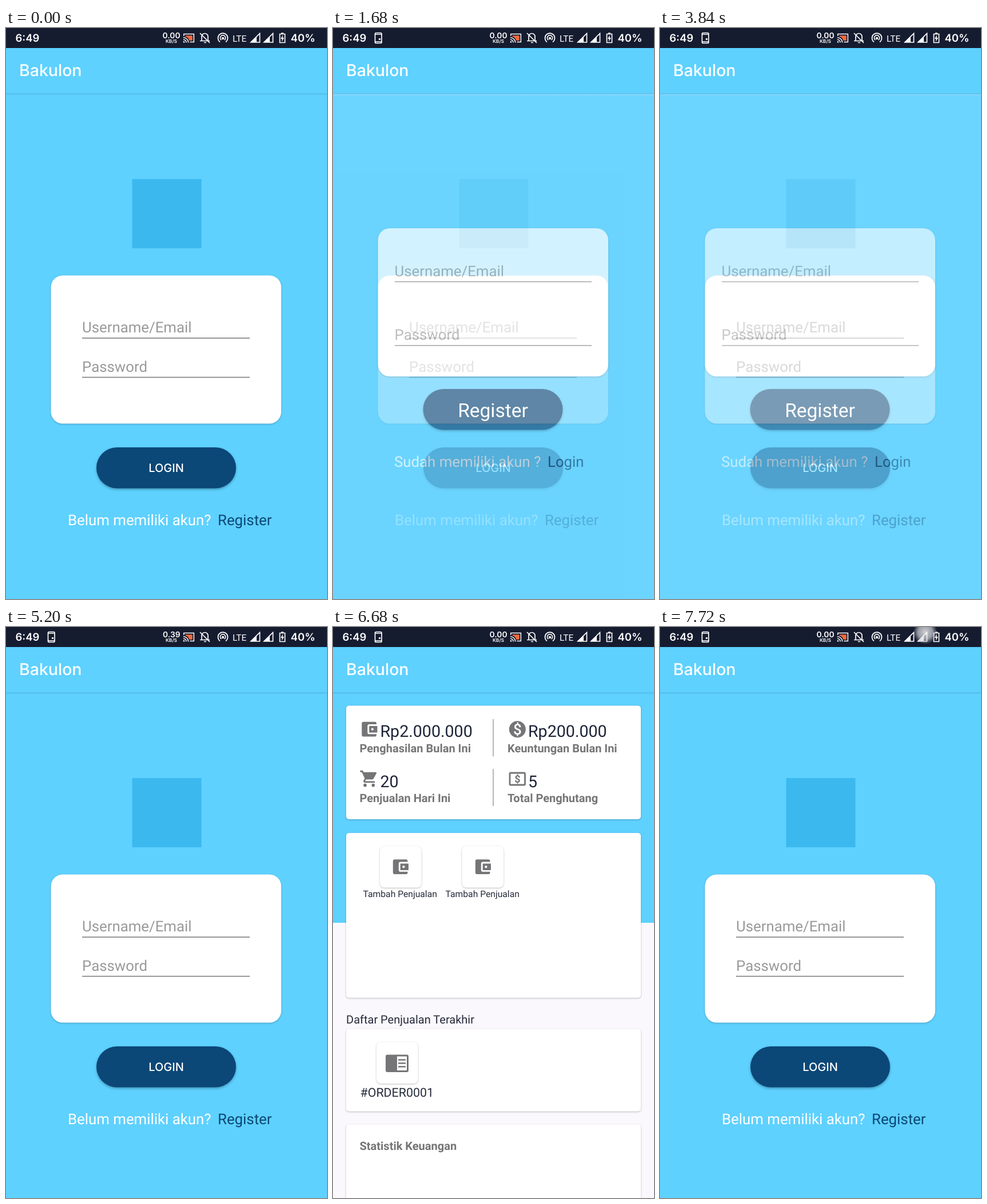
Recreate the animation shown at these times as an HTML page. Size 561 px wide and 998 px high, loop 7800 ms.

```html
<!DOCTYPE html>
<html lang="id">
<head>
<meta charset="utf-8">
<title>Login flow</title>
<style>
  html, body { margin: 0; width: 100%; height: 100%; overflow: hidden; background: #5ed1ff; }
  svg { display: block; width: 561px; height: 998px; font-family: Roboto, sans-serif; text-rendering: geometricPrecision; }
  .ui { font-family: Inter, sans-serif; font-weight: 500; fill: #fff; }
  .bold { font-weight: 600; }
  .form { font-size: 25.8px; }
  .hint { fill: #9a9a9a; }
  .light { fill: #fff; }
  .link { fill: #0b4777; }
  .line { stroke: #757575; stroke-width: 1.5; }
  .card { fill: #fff; filter: drop-shadow(0 1.5px 1.5px rgba(0, 0, 0, .25)); }
  .button { fill: #0b4777; filter: drop-shadow(0 2px 2px rgba(0, 0, 0, .3)); }
  .value { font-size: 28.6px; fill: #1d2538; }
  .label { font-size: 20px; font-weight: 700; fill: #757575; }
  .dark { fill: #252b3b; }
  .icon { fill: #757477; }
  .status { fill: #fff; }
  .stroke { fill: none; stroke: #fff; stroke-width: 1.7; }
</style>
</head>
<body>
<svg viewBox="0 0 561 998">
  <defs>
    <radialGradient id="touch">
      <stop offset="0" stop-color="#fff" stop-opacity=".8"/>
      <stop offset=".65" stop-color="#dadde0" stop-opacity=".65"/>
      <stop offset="1" stop-color="#8a9098" stop-opacity=".2"/>
    </radialGradient>
    <linearGradient id="shade" x2="0" y2="1">
      <stop offset="0" stop-color="#124" stop-opacity=".13"/>
      <stop offset="1" stop-color="#124" stop-opacity="0"/>
    </linearGradient>
    <g id="appBar">
      <rect width="561" height="114" fill="#5ed1ff"/>
      <rect width="561" height="35" fill="#161c30"/>
      <rect y="114" width="561" height="4" fill="url(#shade)"/>
      <text class="ui" x="23" y="84" font-size="28.5">Bakulon</text>
    </g>
    <path id="wallet" d="M21 18v1c0 1.1-.9 2-2 2H5c-1.1 0-2-.9-2-2V5c0-1.1.9-2 2-2h14c1.1 0 2 .9 2 2v1h-9c-1.1 0-2 .9-2 2v8c0 1.1.9 2 2 2zm-9-2h10V8H12zm4-2.5a1.5 1.5 0 010-3 1.5 1.5 0 010 3z"/>
  </defs>

  <g id="login">
    <rect width="561" height="998" fill="#5ed1ff"/>
    <use href="#appBar"/>
    <rect x="220.5" y="264" width="121" height="121" fill="#3bb9ef"/>
    <rect class="card" x="78.5" y="432.5" width="402.5" height="259" rx="20.5"/>
    <g class="form">
      <text class="hint" x="133" y="532">Username/Email</text>
      <text class="hint" x="133" y="600.5">Password</text>
      <path class="line" d="M133 542H426M133 610.5H426"/>
      <text class="light" x="108" y="869">Belum memiliki akun?</text>
      <text class="link" x="370" y="869">Register</text>
    </g>
    <rect class="button" x="158" y="733" width="244" height="71.5" rx="35.7"/>
    <text class="ui" x="280" y="776" font-size="20" text-anchor="middle">LOGIN</text>
  </g>
  <rect id="veil" y="115" width="561" height="883" fill="#fff"/>
  <rect id="dim" width="561" height="998" fill="#052a4c"/>

  <g id="register">
    <rect y="118" width="561" height="880" fill="#5ed1ff"/>
    <rect class="card" x="78.5" y="350" width="402.5" height="259" rx="20.5"/>
    <g class="form">
      <text class="hint" x="107.5" y="433.5">Username/Email</text>
      <text class="hint" x="107.5" y="545">Password</text>
      <path class="line" d="M108 443.5H452M108 555H452"/>
      <text class="light" x="107" y="767">Sudah memiliki akun ?</text>
      <text class="link" x="375" y="767">Login</text>
    </g>
    <rect class="button" x="157.5" y="631" width="244" height="71.5" rx="35.7"/>
    <text class="light" x="279.5" y="680" font-size="33.5" text-anchor="middle">Register</text>
  </g>

  <g id="dash">
    <rect width="561" height="998" fill="#faf8fc"/>
    <rect width="561" height="517" fill="#5ed1ff"/>
    <use href="#appBar"/>
    <rect class="card" x="23" y="137.5" width="515" height="198.5" rx="5"/>
    <rect class="card" x="23" y="360" width="515" height="288" rx="5"/>
    <rect class="card" x="23" y="702.5" width="515" height="144" rx="5"/>
    <path class="card" d="M23 998V874.5q0-5 5-5H533q5 0 5 5V998z"/>
    <path d="M280 161V226M280 248V313" stroke="#9e9e9e" stroke-width="1.5"/>
    <g class="value">
      <text x="82.5" y="192">Rp2.000.000</text>
      <text x="341" y="192">Rp200.000</text>
      <text x="82.5" y="279.5">20</text>
      <text x="341" y="279.5">5</text>
    </g>
    <g class="label">
      <text x="46.5" y="219">Penghasilan Bulan Ini</text>
      <text x="305" y="219">Keuntungan Bulan Ini</text>
      <text x="46.5" y="306">Penjualan Hari Ini</text>
      <text x="305" y="306">Total Penghutang</text>
      <text x="46.5" y="914">Statistik Keuangan</text>
    </g>
    <rect class="card" x="82" y="383" width="72.5" height="72.5" rx="8"/>
    <rect class="card" x="225.5" y="383" width="72.5" height="72.5" rx="8"/>
    <rect class="card" x="76" y="725.5" width="72.5" height="72.5" rx="8"/>
    <g class="icon">
      <use href="#wallet" transform="translate(46 161.5) scale(1.43)"/>
      <use href="#wallet" transform="translate(100.5 402) scale(1.43)"/>
      <use href="#wallet" transform="translate(244.5 402) scale(1.43)"/>
      <circle cx="322.3" cy="178.8" r="14.5"/>
      <text x="322.3" y="188" font-size="26" font-weight="500" text-anchor="middle" fill="#fff">$</text>
      <path transform="translate(46 248) scale(1.43)" d="M1 2h3.3l.9 2H20a1 1 0 01.9 1.5L17.3 12c-.3.6-1 1-1.75 1H8.1l-.9 1.6c-.1.2 0 .4.2.4H19v2H7c-1.5 0-2.5-1.6-1.75-3L6.6 11.6 3 4H1zM7 18a2 2 0 010 4 2 2 0 010-4zm10 0a2 2 0 010 4 2 2 0 010-4z"/>
      <rect x="309" y="255" width="26.5" height="21" rx="1.5" fill="none" stroke="#757477" stroke-width="2.8"/>
      <text x="322.3" y="272" font-size="18" font-weight="700" text-anchor="middle">$</text>
      <path fill-rule="evenodd" d="M95 747.5H129q3 0 3 3V775q0 3-3 3H95q-3 0-3-3V750.5q0-3 3-3zM112 750.5V775H129V750.5z"/>
      <path d="M114 756.5H127M114 762.5H127M114 768.5H127" stroke="#757477" stroke-width="2.5"/>
    </g>
    <g class="dark">
      <text x="52.5" y="472" font-size="15.7">Tambah Penjualan</text>
      <text x="196.5" y="472" font-size="15.7">Tambah Penjualan</text>
      <text x="23" y="693" font-size="20">Daftar Penjualan Terakhir</text>
      <text x="47.5" y="820.5" font-size="21.4">#ORDER0001</text>
    </g>
    <rect id="scroll" x="555.5" y="114" width="5.5" height="646" fill="#6b7680"/>
  </g>

  <g class="status">
    <text class="ui bold" x="16.5" y="24" font-size="18.5">6:49</text>
    <g id="phone">
      <rect class="stroke" x="73.5" y="8.5" width="11.5" height="18" rx="2"/>
      <path class="stroke" d="M73 11H85M73 24H85"/>
      <rect x="80" y="18" width="3" height="3"/>
    </g>
    <text class="ui bold" id="speed" x="304.5" y="18" font-size="13.8" text-anchor="end">0.00</text>
    <text class="ui bold" x="289" y="26" font-size="8.4" text-anchor="middle">KB/S</text>
    <g transform="translate(309 7) scale(.88)">
      <path fill="#f4693c" d="M5 7H19V17H13Q11 10 5 9z"/>
      <path class="stroke" d="M2 8V4H22V20H14M1 11a10 10 0 0110 10M1 15a6 6 0 016 6"/>
      <path d="M1 18v3h3a3 3 0 00-3-3z"/>
    </g>
    <path class="stroke" d="M342 22V15a5.5 5.5 0 0111 0V22M339 22.5H356M339 9L356 26M346 25.5H350"/>
    <path class="stroke" d="M374 24.5a8.5 8.5 0 1110 0M376.3 21a4.6 4.6 0 115.4 0"/>
    <circle cx="379" cy="18" r="2.2"/>
    <text x="396" y="23.5" font-size="15.5">LTE</text>
    <path class="stroke" d="M428 25H443.5V9.500zM451 25H466.5V9.500z"/>
    <path d="M427 25H438V15zM450 25H461V15z"/>
    <path class="stroke" d="M478.5 10.5H487.5V25.5H478.500zM481 9H485"/>
    <path d="M484 12L480 19H482.5L482 24 486 17H483.500z"/>
    <text class="ui bold" x="497.5" y="24" font-size="18.5">40%</text>
  </g>
  <circle id="pointer" r="20" fill="url(#touch)"/>
</svg>

<script>
const LOOP = 7800, OPEN = 5280, CLOSE = 6975, SLIDE = 400;
const el = Object.fromEntries([...document.querySelectorAll('[id]')].map(e => [e.id, e]));
// start, end, x, y
const touches = [
  [40, 240, 418, 855],
  [2400, 2680, 407.5, 789],
  [4720, 4920, 280, 768],
  [7720, 7900, 463.5, 9]
];

const ramp = (t, from, to) => Math.min(1, Math.max(0, (t - from) / (to - from)));
const smooth = p => p * p * (3 - 2 * p);
const cubic = (a, b, c, d, u) => {
  const v = 1 - u;
  return a * v * v * v + 3 * b * u * v * v + 3 * c * u * u * v + d * u * u * u;
};

// Fast start with a very long settle: two joined Bezier segments.
function settle(p) {
  const [xs, ys] = p < 1 / 6
    ? [[0, .05, .1333, 1 / 6], [0, 0, .06, .4]]
    : [[1 / 6, .2083, .25, 1], [.4, .82, 1, 1]];
  let low = 0, high = 1;
  for (let i = 0; i < 24; i++) {
    const mid = (low + high) / 2;
    if (cubic(...xs, mid) < p) low = mid; else high = mid;
  }
  return cubic(...ys, low);
}

function show(node, opacity) {
  node.style.opacity = opacity;
  node.style.display = opacity > 0 ? '' : 'none';
}

function scale(node, s, x = 280.5, y = 499) {
  node.setAttribute('transform', `translate(${x} ${y}) scale(${s}) translate(${-x} ${-y})`);
}

function render(t) {
  const reg = t < 3360
    ? smooth(ramp(t, 1320, 1920))
    : 1 - ramp(t, 3360, 4120) ** 1.7;
  show(el.register, reg);
  show(el.veil, .35 * reg);

  const closing = t >= CLOSE;
  const start = closing ? CLOSE : OPEN;
  const p = settle(ramp(t, start, start + SLIDE));
  scale(el.login, closing ? 1.1 - .1 * p : 1 + .15 * p);
  scale(el.dash, closing ? 1 - .1 * p : .85 + .15 * p);
  show(el.dash, closing
    ? 1 - ramp(t, CLOSE + 35, CLOSE + 85)
    : ramp(t, OPEN + 50, OPEN + 100));
  show(el.dim, closing ? 0 : .55 * p);
  show(el.scroll, .55 * (1 - ramp(t, 5540, 5640)));

  const phone = smooth(ramp(t, 420, 680));
  show(el.phone, phone);
  scale(el.phone, phone, 79, 17.5);
  el.speed.textContent = t >= 5080 && t < 6080 ? '0.39' : '0.00';

  const touch = touches.find(([from, to]) => t >= from && t < to);
  show(el.pointer, touch ? Math.min(1, (touch[1] - t) / 100) : 0);
  if (touch) {
    el.pointer.setAttribute('cx', touch[2]);
    el.pointer.setAttribute('cy', touch[3]);
  }
}

const began = performance.now();
function tick() {
  render((performance.now() - began) % LOOP);
  requestAnimationFrame(tick);
}
tick();
</script>
</body>
</html>
```
